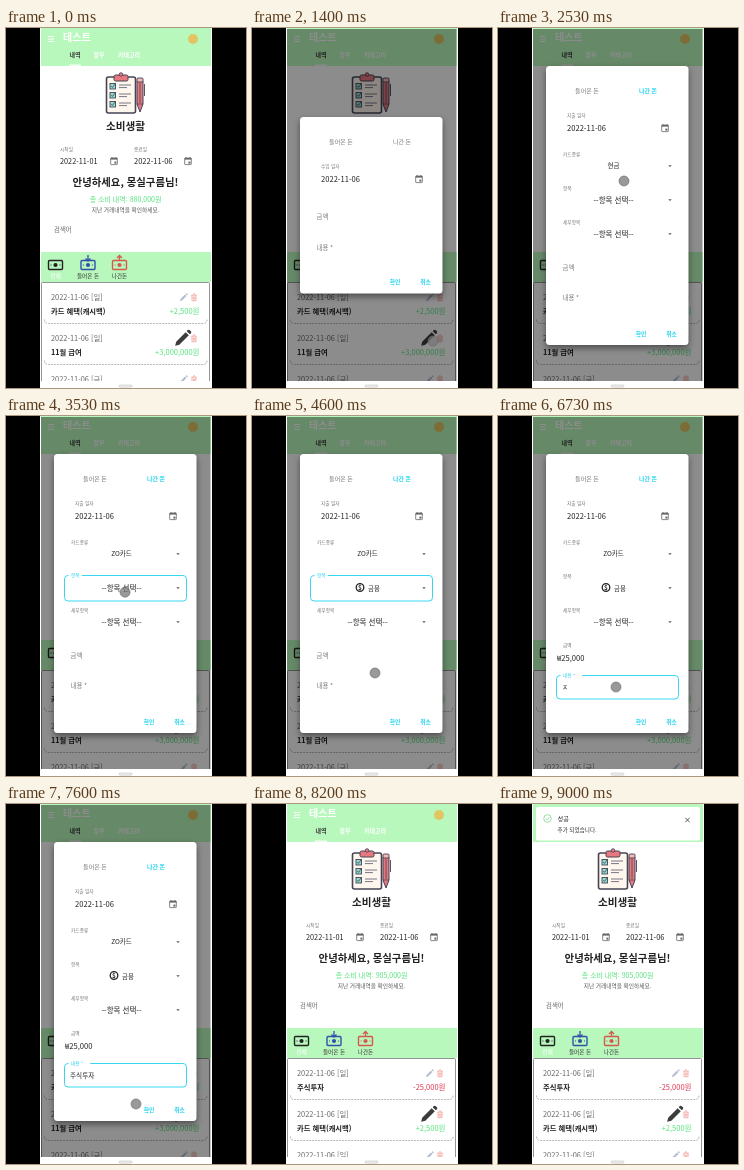
Recreate the animation shown at these times as an HTML page. Size 240 by 360 pixels, loop 9.07 s.

```html
<!DOCTYPE html>
<html lang="ko">
<head>
<meta charset="utf-8">
<title>소비생활</title>
<style>
  html, body { margin: 0; width: 100%; height: 100%; overflow: hidden; background: #000; }
  svg { display: block; width: 100%; height: 100%; }
  text { font-family: "Noto Sans CJK KR", "Noto Sans CJK", "Noto Sans", sans-serif; white-space: pre; }
  .dialog { filter: drop-shadow(0 3px 3px rgba(0, 0, 0, .45)); }
</style>
</head>
<body>
<svg id="stage" viewBox="0 0 240 360"></svg>
<script>
const LOOP = 9070;
const MINT = '#b9f8bd', GREEN = '#55e27c', CYAN = '#22d3f0', INK = '#222', GREY = '#777', RED = '#e0354f';
const stage = document.getElementById('stage');

const clamp = v => Math.max(0, Math.min(1, v));
const ease = v => v * v * (3 - 2 * v);
const ramp = (t, from, to) => ease(clamp((t - from) / (to - from)));

// y is the optical middle of the line
const text = (x, y, str, size, fill = INK, weight = 400, anchor = 'start') =>
  `<text x="${x}" y="${(y + size * .37).toFixed(2)}" font-size="${size}" fill="${fill}" font-weight="${weight}" text-anchor="${anchor}">${str}</text>`;
const mid = (x, y, str, size, fill, weight) => text(x, y, str, size, fill, weight, 'middle');
const rect = (x, y, w, h, fill, extra = '') =>
  `<rect x="${x}" y="${y}" width="${w}" height="${h}" fill="${fill}" ${extra}/>`;
const line = (d, stroke, width = 1, extra = '') =>
  `<path d="${d}" fill="none" stroke="${stroke}" stroke-width="${width}" ${extra}/>`;
const disc = (x, y, r, fill, extra = '') => `<circle cx="${x}" cy="${y}" r="${r}" fill="${fill}" ${extra}/>`;
const at = (x, y, body, extra = '') => `<g transform="translate(${x} ${y}) ${extra}">${body}</g>`;

const calendar = (x, y) => at(x, y,
  rect(-3.3, -3, 6.6, 6.6, 'none', 'stroke="#666" stroke-width=".8" rx=".5"') +
  rect(-3.3, -3, 6.6, 1.6, '#666') + rect(.4, .6, 2, 2, '#666') +
  line('M-2-4v1.5M2-4v1.5', '#666', .8));

const pencil = (x, y, scale, fill) => at(x, y,
  `<path d="M-7 7l1-4L3-6l3 3L-3 6zM4-7l1-1q1-.7 2 .2l1 1q.8.9 0 1.8l-1 1z" fill="${fill}"/>`, `scale(${scale})`);

const trash = (x, y) => at(x, y,
  line('M-2.6-2.4H2.6M-1-3.5H1M-2-2.4V3.2H2V-2.4M-.6-1V2M.7-1V2', '#ef8f86', .7));

const money = (x, y, color, arrow = '') => at(x, y,
  rect(-7, -4.5, 14, 9, 'none', `stroke="${color}" stroke-width="1.4" rx="1"`) +
  disc(0, 0, 2.1, color) + line('M-5 0h1M4 0h1', color, 1.2) +
  (arrow && line(arrow, color, 1.3)));

const clipboard = () =>
  rect(100.5, 49, 29, 36, '#fff6ee', 'rx="2" stroke="#454555" stroke-width="1.6"') +
  rect(108, 47, 14, 6, '#e87880', 'rx="1.5" stroke="#454555"') +
  disc(115, 46.5, 1.8, '#e87880', 'stroke="#454555" stroke-width=".8"') +
  [58, 67, 76].map(y =>
    rect(104, y - 2.5, 5.5, 5.5, '#8fdcd0', 'stroke="#454555" stroke-width=".9"') +
    line(`M105.3 ${y}l1.2 1.4 3-4`, '#454555', .8) +
    line(`M113 ${y - 1}h12M113 ${y + 1.6}h8`, '#777787', 1)).join('') +
  `<path d="M131 53v23l3 8 3-8V53z" fill="#e87880" stroke="#454555"/>` +
  rect(131, 50, 6, 4, '#f5b7b2', 'rx="1" stroke="#454555" stroke-width=".9"') +
  line('M131 76h6M134 55v20', '#454555', .8) +
  line('M138.5 56v12', '#454555', .9);

const entries = [
  ['일', '주식투자', '-25,000원'],
  ['일', '카드 혜택(캐시백)', '+2,500원'],
  ['일', '11월 급여', '+3,000,000원'],
  ['금', '생활비', '-30,000원'],
];

const entry = ([day, title, sum], i) => {
  const y = 269.5 + i * 41;
  return text(45, y, `2022-11-06 [${day}]`, 7.4, '#666', 500) +
    pencil(177.5, y, .5, '#b5bdd0') + trash(188, y) +
    text(45, y + 13.5, title, 7.3, INK, 700) +
    text(193.5, y + 13.5, sum, 7.5, sum[0] === '-' ? RED : GREEN, 500, 'end') +
    line(`M38.5 ${y + 22}q0 4 4 4H197q4 0 4-4`, '#999', .7, 'stroke-dasharray="2 1"');
};

function header() {
  return rect(35, 0, 170, 38, MINT) +
    line('M42 8.5h6M42 11h6M42 13.5h6', '#fff', 1) +
    text(57, 9.5, '테스트', 10, '#fff', 700) +
    disc(187, 11, 5, '#e2c562') +
    mid(69, 27, '내역', 6, '#333', 700) +
    mid(93, 27, '할부', 6, '#fff', 700) +
    mid(123, 27, '카테고리', 6, '#fff', 700) +
    rect(63, 36.5, 12, 1.2, '#fff');
}

function page(saved) {
  const rows = saved ? entries.slice(0, 3) : entries.slice(1);
  return rect(34, 0, 172, 360, '#fff') + header() + clipboard() +
    mid(119.5, 98, '소비생활', 10.6, INK, 700) +
    text(54, 121, '시작일', 4.7, GREY) + text(128, 121, '종료일', 4.7, GREY) +
    text(54, 133, '2022-11-01', 7.3, INK, 500) + calendar(108, 133) +
    text(128, 133, '2022-11-06', 7.5, INK, 500) + calendar(182, 133) +
    mid(119.5, 154, '안녕하세요, 몽실구름님!', 10.4, INK, 700) +
    mid(119.5, 171, `총 소비 내역: ${saved ? '905' : '880'},000원`, 7, GREEN, 500) +
    mid(119.5, 182, '지난 거래내역을 확인하세요.', 5.7, '#555') +
    text(48, 201.5, '검색어', 6.4, '#666') +
    rect(35, 224, 170, 30, MINT) +
    money(49.5, 237, '#222') +
    money(82, 237, '#3450a8', 'M0-10v6M-2.5-6.5L0-4l2.5-2.5') +
    money(113.5, 237, '#d4594c', 'M0-4v-5M-2.5-7L0-9.5 2.5-7') +
    mid(49.5, 248, '전체', 5.8, '#fff', 500) +
    mid(82, 248, '들어온 돈', 5.6, '#333') + mid(113.5, 248, '나간돈', 5.6, '#333') +
    rect(35.5, 254.5, 168, 110, '#fff', 'stroke="#666" stroke-width=".7" rx="1"') +
    rows.map(entry).join('') +
    pencil(176.5, 310.5, 1.05, '#3c3c3c');
}

const homeBar = () => rect(34, 353, 172, 7, '#fff') +
  rect(113, 357, 13, 2.2, '#eee', 'rx="1" stroke="#bbb" stroke-width=".5"');

// Outlined box with a gap for its label
const focusBox = (y, h, label) =>
  rect(58.5, y, 122, h, 'none', `rx="3.5" stroke="${CYAN}" stroke-width=".9"`) +
  rect(62.5, y - 2, 5 + label.length * 4.2, 4, '#fff') + text(65, y, label, 4.7, CYAN, 500);

const select = (y, label, value, focused) =>
  (focused ? focusBox(y - 12.5, 25.5, label) : text(65, y - 12, label, 4.7, GREY)) +
  value + `<path d="M170.3 ${y - .8}h3.4l-1.7 1.8z" fill="#555"/>`;

const coin = y => disc(108, y - 1.5, 3.8, '#fff', 'stroke="#222" stroke-width="1.3"') +
  mid(108, y - 1.5, '$', 6.5, INK, 700) + text(116, y, '금융', 6.4, INK, 500);

const between = (t, a, b) => t >= a && t < b;

// Last value whose time has come
const latest = (t, steps) => steps.reduce((v, [from, next]) => t >= from ? next : v, '');

const amounts = [[5400, '₩2'], [5570, '₩25'], [5700, '₩250'], [5830, '₩2,500'], [6030, '₩25,000']];
const memos = [[6670, 'ㅈ'], [6740, '주'], [6870, '줏'], [6940, '주시'], [7000, '주식'],
  [7130, '주식ㅌ'], [7200, '주식투'], [7330, '주식툊'], [7400, '주식투자']];

function dialog(t) {
  const wide = t >= 1800, top = wide ? 38 : 89, height = wide ? 279 : 176.5;
  const low = wide ? top + 201.5 : top + 100;
  const onAmount = between(t, 4800, 6470), onMemo = between(t, 6470, 7850);
  const amount = latest(t, amounts), memo = latest(t, memos);
  const blank = y => mid(115.5, y, '--항목 선택--', 7.5, INK, 500);
  const caret = (x, y) => t % 1000 < 500 ? rect(x, y - 4, .7, 8, INK) : '';

  let body = rect(48, top, 142.5, height, '#fff', 'rx="3.5" class="dialog"') +
    mid(89, top + 25, '들어온 돈', 6, GREY) +
    mid(150, top + 25, '나간 돈', 6, wide ? CYAN : GREY, wide ? 700 : 400) +
    text(69, top + 49.6, wide ? '지출 일자' : '수입 일자', 4.7, GREY) +
    text(69, top + 62, '2022-11-06', 7.6, INK, 500) + calendar(167, top + 62);

  if (wide) {
    body += select(138, '카드종류', mid(115.5, 138, t < 3000 ? '현금' : 'ZO카드', 6.5, INK, 500), between(t, 2800, 3400)) +
      select(172, '항목', t < 4070 ? blank(172) : coin(173), between(t, 3400, 4800)) +
      select(206, '세부항목', blank(206), false);
  }

  if (onAmount || amount) {
    body += text(65, low - 10.5, '금액', 4.7, onAmount ? CYAN : GREY, 500) +
      text(59, low + 2.5, amount, 7.6, INK, 500);
    if (onAmount) body += line(`M59 ${low + 9.5}H179`, '#5fdfc4', 1) +
      caret(amount ? 60 + amount.replace(',', '').length * 4.9 : 59, low + 2.5);
  } else {
    body += text(64.5, low, '금액', 6.4, GREY);
  }

  if (onMemo || memo) {
    body += onMemo ? focusBox(259.5, 23.5, '내용 *') : text(65, 259.5, '내용 *', 4.7, GREY);
    body += text(64, 271.5, memo, 6.6, INK, 500);
    if (onMemo) body += caret(64.5 + memo.length * 6.1, 271.5);
  } else {
    body += text(64.5, low + 30.5, '내용 *', 6.4, GREY);
  }

  const foot = top + height - 11.5;
  return body + mid(143, foot, '확인', 5.8, CYAN, 700) + mid(173.5, foot, '취소', 5.8, CYAN, 700);
}

const pointerPath = [
  [700, 181, 313], [1450, 181, 313], [1720, 150, 115], [1850, 150, 115], [2330, 122, 140], [2530, 126, 153],
  [2750, 116, 139], [3000, 116, 146], [3350, 118, 172], [3700, 120, 180], [4070, 120, 190],
  [4600, 123, 257], [4800, 118, 243], [6200, 118, 243], [6470, 118, 271],
  [7350, 118, 271], [7600, 130, 300], [7780, 143, 305], [7950, 143, 305],
];

function pointer(t) {
  const i = pointerPath.findIndex(p => p[0] > t);
  if (i < 1) return '';
  const [t0, x0, y0] = pointerPath[i - 1], [t1, x1, y1] = pointerPath[i];
  const k = ramp(t, t0, t1);
  return disc(x0 + (x1 - x0) * k, y0 + (y1 - y0) * k, 5, '#777', 'fill-opacity=".75" stroke="#666" stroke-width=".6"');
}

function toast(t) {
  const k = ramp(t, 8200, 8450);
  if (!k) return '';
  return at(0, (k - 1) * 40,
    rect(36, 1, 168, 37, MINT) + rect(38, 3, 164, 33.5, '#fff', 'rx="2"') +
    disc(49.5, 14.5, 3.8, 'none', 'stroke="#8edca0" stroke-width=".9"') +
    line('M47.7 14.5l1.4 1.5 2.5-3', '#8edca0', .9) +
    text(59.5, 15, '성공', 6.2, INK, 500) +
    text(59.5, 25.5, '추가 되었습니다.', 5.6, '#333') +
    line('M187.3 13.8l4.4 4.4M191.7 13.8l-4.4 4.4', '#444', .9));
}

function draw(t) {
  const shown = ramp(t, 980, 1180) * (1 - ramp(t, 7900, 8080));
  let out = page(t >= 8070);
  if (shown) out += `<g opacity="${shown.toFixed(3)}">` +
    rect(35, 1, 169.5, 352, '#000', 'fill-opacity=".45"') + dialog(t) + '</g>';
  return out + toast(t) + homeBar() + pointer(t) +
    rect(0, 0, 34, 360, '#000') + rect(206, 0, 34, 360, '#000');
}

let last = '';
const start = performance.now();
function tick() {
  const next = draw((performance.now() - start) % LOOP);
  if (next !== last) stage.innerHTML = last = next;
  requestAnimationFrame(tick);
}
tick();
</script>
</body>
</html>
```
